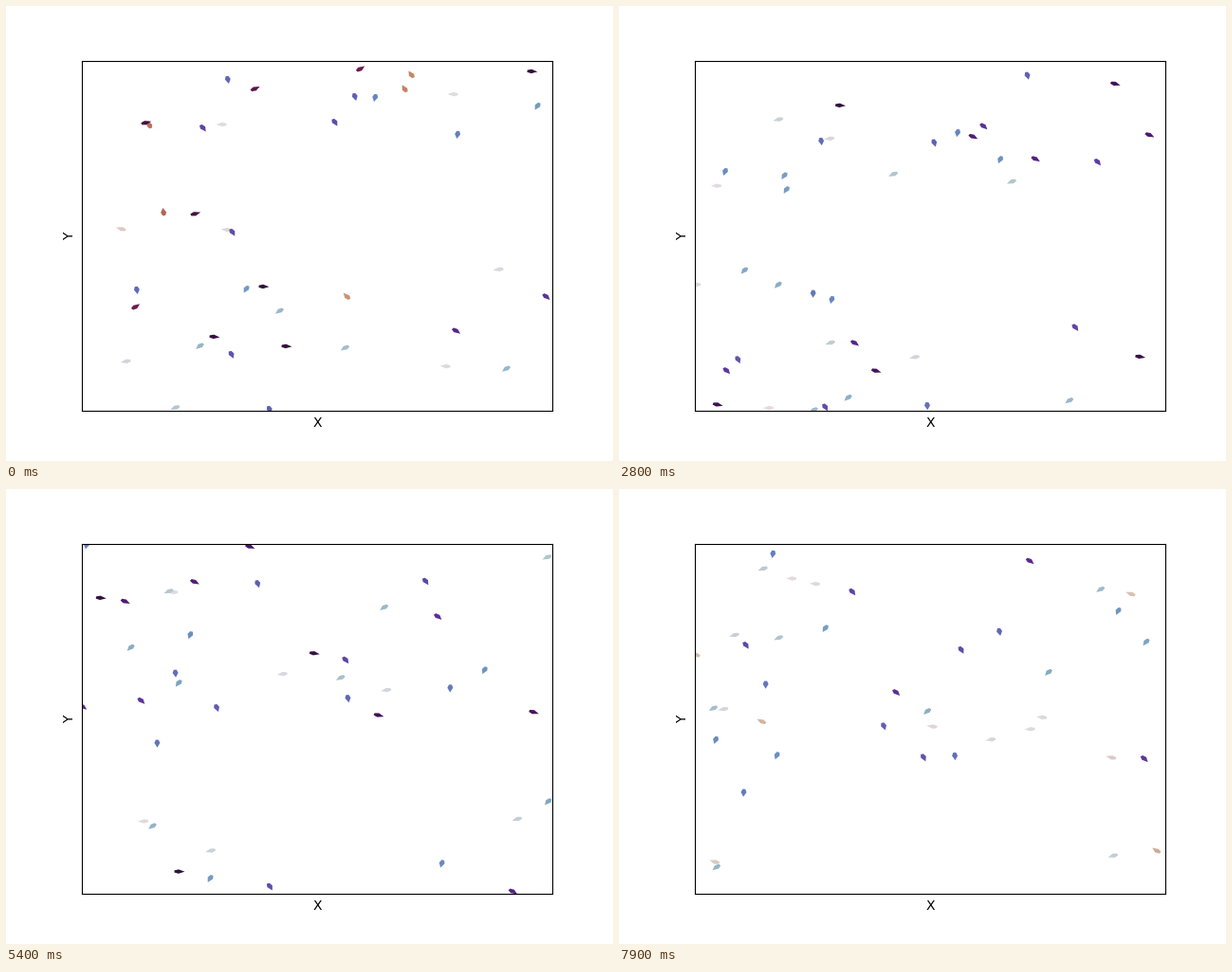
These frames come from a looping animation (640x480 px, 8000 ms). A matplotlib script:

```python
import numpy as np
import matplotlib.pyplot as plt
from matplotlib.animation import FuncAnimation
from matplotlib.collections import PolyCollection

FRAMES, INTERVAL = 80, 100
SIZE = 100.0          # side of the periodic box
SPEED = 1.0           # distance per step
SPREAD = np.pi        # full width of the heading noise

# Starting flock: x px, y px, heading in degrees
START = np.array([
    (234, 78, -80), (263, 87, 32), (374, 66, 40), (427, 72, 118),
    (420, 87, 115), (555, 69, -5), (471, 93, 178), (368, 96, -78),
    (389, 97, -100), (560, 106, -115), (151, 125, 105), (148, 123, 18),
    (227, 125, 180), (208, 129, -60), (347, 123, -65), (476, 136, -97),
    (166, 217, 97), (200, 219, 20), (121, 235, 160), (232, 236, 172),
    (239, 239, -65), (138, 300, -82), (137, 317, 42), (253, 299, -115),
    (272, 296, -3), (288, 322, -137), (359, 306, 125), (519, 278, -170),
    (570, 307, -50), (475, 343, -42), (220, 349, -8), (204, 359, -135),
    (238, 368, -70), (296, 359, -5), (126, 375, -165), (357, 361, -142),
    (463, 380, 175), (527, 383, -138), (178, 424, -150), (278, 426, -75),
], float)

# Mean heading of the flock over time
COURSE_T = [0, 10, 19, 28, 35, 42, 48, 54, 62, 70, 74, 79]
COURSE_A = [-2.0, -1.9, -2.05, -1.65, -2.3, -2.2,
            -1.95, -1.6, -1.85, -2.2, -2.45, -2.3]

# Arrow outline in box units, pointing along +x
ARROW = np.array([(-1.1, 0.3), (-0.2, 0.6), (1.1, 0),
                  (-0.2, -0.6), (-1.1, -0.3)])


def wrap_angle(a):
    return (a + np.pi) % (2 * np.pi) - np.pi


def simulate():
    """Positions and headings of every bird at every step."""
    rng = np.random.default_rng(4)
    n = len(START)
    pos = np.empty((FRAMES, n, 2))
    head = np.empty((FRAMES, n))
    pos[0, :, 0] = (START[:, 0] - 80) / 496 * SIZE
    pos[0, :, 1] = (427.2 - START[:, 1]) / 369.6 * SIZE
    head[0] = np.radians(START[:, 2])
    for i in range(1, FRAMES):
        # evenly spread noise keeps the mean heading on course
        noise = SPREAD * ((rng.permutation(n) + rng.random(n)) / n - 0.5)
        head[i] = np.interp(i, COURSE_T, COURSE_A) + noise
        step = np.stack([np.cos(head[i]), np.sin(head[i])], axis=1)
        pos[i] = (pos[i - 1] + SPEED * step) % SIZE
    return pos, wrap_angle(head)


def outlines(pos, head):
    c, s = np.cos(head)[:, None], np.sin(head)[:, None]
    x = c * ARROW[:, 0] - s * ARROW[:, 1]
    y = s * ARROW[:, 0] + c * ARROW[:, 1]
    return np.stack([x, y], axis=2) + pos[:, None, :]


pos, head = simulate()

fig, ax = plt.subplots(figsize=(6.4, 4.8), dpi=100)
ax.set(xlim=(0, SIZE), ylim=(0, SIZE), xticks=[], yticks=[],
       xlabel="X", ylabel="Y")
birds = PolyCollection(outlines(pos[0], head[0]), array=head[0],
                       cmap="twilight", linewidths=0)
birds.set_clim(-np.pi, np.pi)
ax.add_collection(birds, autolim=False)


def draw(i):
    birds.set_verts(outlines(pos[i], head[i]))
    birds.set_array(head[i])
    return birds,


anim = FuncAnimation(fig, draw, frames=FRAMES, interval=INTERVAL,
                     repeat=True, repeat_delay=0)
plt.show()
```
